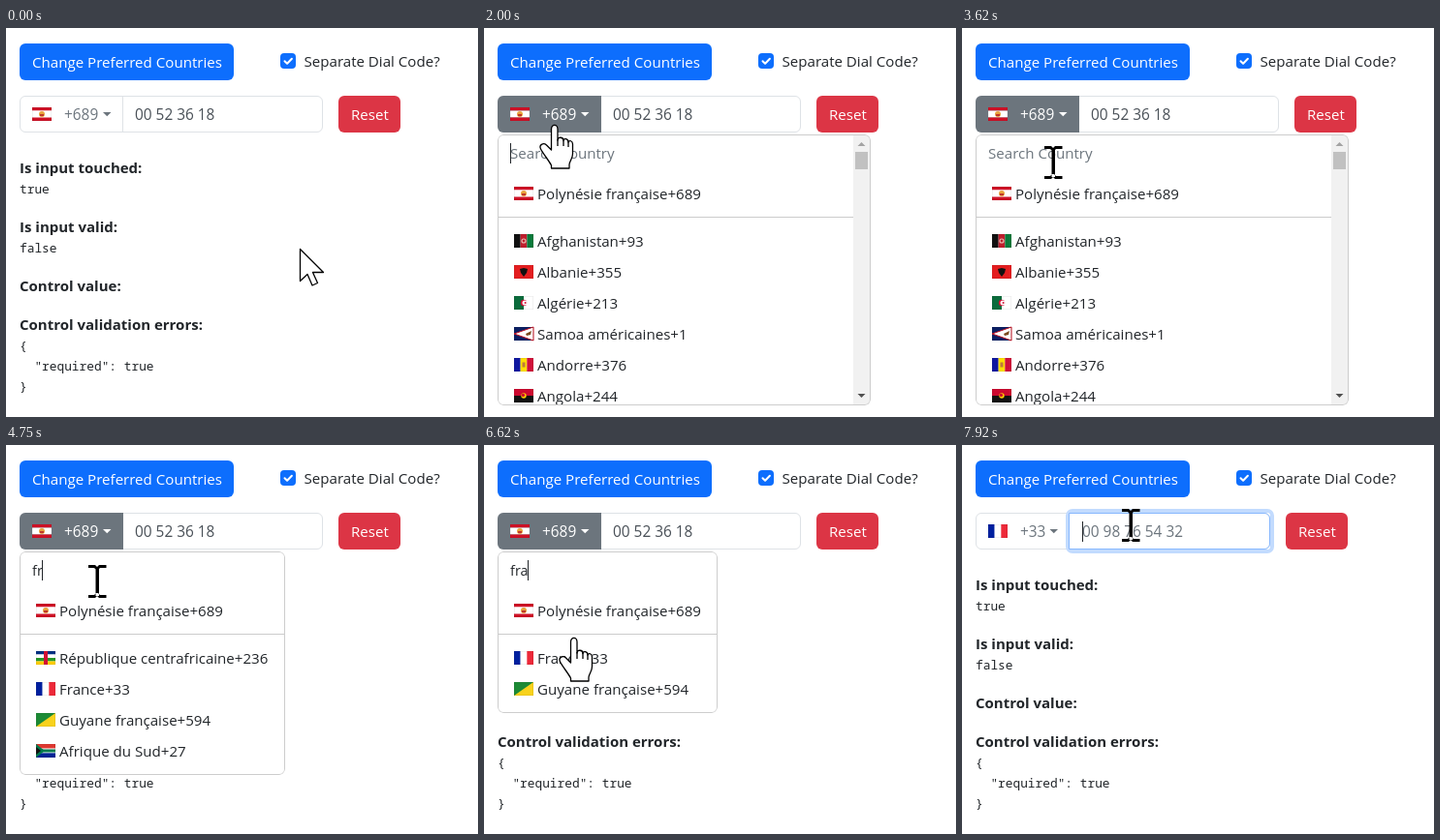
Write an HTML page that moves like this. It is 487x402 px and loops after 7.99 s.

```html
<!DOCTYPE html>
<html lang="en">
<head>
<meta charset="utf-8">
<title>Phone input demo</title>
<style>
  html, body { margin: 0; width: 100%; height: 100%; overflow: hidden; background: #fff; }
  svg { display: block; width: 487px; height: 402px; }
  text { font: 15.1px "Open Sans", "Noto Sans", sans-serif; fill: #212529; white-space: pre; }
  .bold { font-weight: 700; font-size: 15px; }
  .mono { font: 12.83px "Noto Sans Mono", "Liberation Mono", monospace; }
  .num { font-size: 15.4px; fill: #495057; }
  .query { font-size: 14.4px; }
  .muted { fill: #6c757d; }
  .white { fill: #fff; }
</style>
</head>
<body>
<svg viewBox="0 0 487 402" xmlns="http://www.w3.org/2000/svg">
  <defs><clipPath id="menuClip"><rect id="menuClipBox" x="14" y="110" rx="6"/></clipPath></defs>
  <g id="page"></g>
  <g id="field"></g>
  <g id="menu" clip-path="url(#menuClip)"></g>
  <path id="caret" stroke="#212529" stroke-width="1"/>
  <g id="cursor"></g>
</svg>
<script>
const LOOP = 7990;
const $ = id => document.getElementById(id);
const rect = (x, y, w, h, fill, extra = '') =>
  `<rect x="${x}" y="${y}" width="${w}" height="${h}" fill="${fill}" ${extra}/>`;
const shape = (d, fill, extra = '') => `<path d="${d}" fill="${fill}" ${extra}/>`;
const dot = (x, y, r, fill) => `<circle cx="${x}" cy="${y}" r="${r}" fill="${fill}"/>`;
const text = (x, y, s, cls = '', extra = '') =>
  `<text x="${x}" y="${y}" class="${cls}" ${extra}>${s}</text>`;
const clamp = v => Math.min(1, Math.max(0, v));
const ramp = (t, a, b) => clamp((t - a) / (b - a));
const smooth = p => p * p * (3 - 2 * p);
const lerp = (a, b, p) => a + (b - a) * p;

// Flags, drawn on a 20 x 14 field
const bars = (...c) => c.map((f, i) => rect(i * 20 / c.length, 0, 20 / c.length, 14, f)).join('');
const bands = (...c) => c.map((f, i) => rect(0, i * 14 / c.length, 20, 14 / c.length, f)).join('');
const ensign = c => rect(0, 0, 20, 14, c) +
  shape('M0 0L10 7M10 0L0 7M5 0V7M0 3.5H10', 'none', 'stroke="#fff" stroke-width="2"') +
  shape('M5 0V7M0 3.5H10', 'none', 'stroke="#c8102e"') + rect(13, 4, 4, 6, '#e8e8e8');
const RED = '#ce1126';
const FLAGS = {
  pf: bands(RED, '#fff', '#fff', RED) + dot(10, 7, 3, '#e8a33d') + rect(8, 7, 4, 2, '#c0392b'),
  af: bars('#111', '#be1e2d', '#0a7a3b') + dot(10, 7, 2.6, '#e8b9ae') + dot(10, 7, 1.4, '#be1e2d'),
  al: rect(0, 0, 20, 14, '#e41e20') + shape('M10 3L14 4L13 8L10 12L7 8L6 4Z', '#111'),
  dz: bars('#0b6b3c', '#fff') + dot(10, 7, 3.2, '#d21034') + dot(11, 7, 2.5, '#fff') + dot(11.6, 7, 1, '#d21034'),
  as: rect(0, 0, 20, 14, '#0b1f63') + shape('M20 0L0 7L20 14Z', '#fff', 'stroke="#bd1021"') +
    shape('M12 7L18 4L17 8L13 9Z', '#7b4a1e'),
  ad: bars('#1018a0', '#fedf00', '#d0103a') + rect(8.5, 4.5, 3, 5, '#c07a3a'),
  ao: bands('#cc092f', '#111') + dot(10, 7, 2.7, '#ffcb00') + dot(9.4, 6.4, 1.7, '#cc092f'),
  fr: bars('#00209f', '#fff', '#ed2939'),
  gf: rect(0, 0, 20, 14, '#f8d21c') + shape('M0 0H20L0 14Z', '#1c8a35') + '',
  bf: bands('#ef2b2d', '#009e49') + dot(10, 7, 2, '#fcd116'),
  cf: bands('#003082', '#fff', '#289728', '#ffce00') + rect(8, 0, 4, 14, '#d21034'),
  fk: ensign('#012169'),
  fo: rect(0, 0, 20, 14, '#fff') + shape('M7 0V14M0 7H20', 'none', 'stroke="#0065bd" stroke-width="4"') +
    shape('M7 0V14M0 7H20', 'none', 'stroke="#ed2939" stroke-width="2"'),
  fj: ensign('#68bfe5'),
  za: bands('#de3831', '#fff', '#002395') + rect(0, 5.5, 20, 3, '#007a4d') +
    shape('M0 0L9 7L0 14Z', '#007a4d') + shape('M0 3L5 7L0 11Z', '#111')
};
const flag = (x, y, code) => `<g transform="translate(${x} ${y})">${FLAGS[code]}` +
  rect(.25, .25, 19.5, 13.5, 'none', 'stroke="#000" stroke-opacity=".1" stroke-width=".5"') + '</g>';

const NAMES = {
  af: 'Afghanistan+93', al: 'Albanie+355', dz: 'Algérie+213', as: 'Samoa américaines+1',
  ad: 'Andorre+376', ao: 'Angola+244', fr: 'France+33', gf: 'Guyane française+594',
  bf: 'Burkina Faso+226', cf: 'République centrafricaine+236', fk: 'Îles Malouines+500',
  fo: 'Îles Féroé+298', fj: 'Fidji+679', za: 'Afrique du Sud+27'
};
const VIEWS = {
  '': { w: 385, h: 280, caret: 27.5, rows: ['af', 'al', 'dz', 'as', 'ad', 'ao'], thumb: 18 },
  f: { w: 312, h: 280, caret: 32.5, rows: ['af', 'bf', 'cf', 'fk', 'fo', 'fj'], thumb: 120 },
  fr: { w: 274, h: 231, caret: 37.5, rows: ['cf', 'fr', 'gf', 'za'] },
  fra: { w: 227, h: 167, caret: 45.5, rows: ['fr', 'gf'] }
};

function drawMenu(query, hover) {
  const { w, h, rows, thumb } = VIEWS[query];
  const right = 14 + w, bottom = 110 + h;
  const inner = thumb ? right - 18 : right - 1;
  let s = rect(14, 110, w, h, '#fff');
  s += query ? text(27, 135, query, 'query') : text(27, 135, 'Search Country', 'muted');
  s += flag(31, 164, 'pf') + text(55, 177, 'Polynésie française+689');
  s += rect(15, 195, inner - 15, 1, '#cbcbcb');
  if (hover) s += rect(15, 204, inner - 15, 32, '#f2f2f2');
  rows.forEach((code, i) => {
    const y = 220 + 32 * i;
    s += flag(31, y - 7, code) + text(55, y + 6, NAMES[code]);
  });
  if (thumb) {
    const mid = right - 9.5;
    s += rect(right - 18, 111, 17, h - 2, '#f1f1f1') + rect(right - 16, 128, 13, thumb, '#c1c1c1');
    s += shape(`M${mid - 4} 122h8l-4 -4z`, '#a3a3a3');
    s += shape(`M${mid - 4} ${bottom - 12}h8l-4 4z`, '#505050');
  }
  s += rect(14.5, 110.5, w - 1, h - 1, 'none', 'rx="5.5" stroke="#cdcdcd"');
  $('menu').innerHTML = s;
  $('menuClipBox').setAttribute('width', w);
  $('menuClipBox').setAttribute('height', h);
}

function drawPage() {
  const lines = [
    [150, 'Is input touched:', 'bold'], [171, 'true', 'mono'],
    [211, 'Is input valid:', 'bold'], [232, 'false', 'mono'],
    [272, 'Control value:', 'bold'], [312, 'Control validation errors:', 'bold'],
    [333, '{', 'mono'], [375, '}', 'mono']
  ];
  $('page').innerHTML = rect(14, 16, 221, 38, '#0d6efd', 'rx="6"') +
    text(27, 41, 'Change Preferred Countries', 'white') +
    rect(283, 26, 16, 16, '#0d6efd', 'rx="4"') +
    shape('M287.5 34.2l2.6 2.6l4.8 -5', 'none',
      'stroke="#fff" stroke-width="2" stroke-linecap="round" stroke-linejoin="round"') +
    text(307.5, 40, 'Separate Dial Code?') +
    lines.map(([y, s, cls]) => text(14, y, s, cls)).join('') +
    text(29.4, 354, '"required": true', 'mono');
}

function drawField(chosen, grey, focus) {
  const split = chosen ? 111 : 121, right = chosen ? 318 : 327;
  const ink = [108, 117, 125].map(c => Math.round(lerp(c, 255, grey)));
  const fill = `rgb(${ink})`;
  const arrow = chosen ? 90.5 : 100;
  let s = rect(14.5, 70.5, right - 15, 37, '#fff', 'rx="5.5" stroke="#dee2e6"');
  s += rect(split - 1, 71, 1, 36, '#dee2e6');
  s += shape(`M${split} 70H20a6 6 0 0 0 -6 6v26a6 6 0 0 0 6 6H${split}z`, '#6c757d', `opacity="${grey}"`);
  s += flag(27, 82, chosen ? 'fr' : 'pf');
  s += text(60, 95, chosen ? '+33' : '+689', 'num', `style="fill:${fill}"`);
  s += shape(`M${arrow} 87h8.5l-4.25 4.3z`, fill);
  if (chosen) {
    s += rect(109, 68, 211, 42, 'none', `rx="5" stroke="#c2dbfe" stroke-width="4" opacity="${focus}"`);
    s += shape('M110.5 70.5H312a5.5 5.5 0 0 1 5.5 5.5v26a5.5 5.5 0 0 1 -5.5 5.5H110.5z', '#fff',
      `stroke="#86b7fe" stroke-opacity="${focus}"`);
    s += text(124, 95, '00 98 76 54 32', 'num muted');
  } else {
    s += text(133, 95, '00 52 36 18', 'num');
  }
  s += rect(right + 16, 70, 64, 38, '#dc3545', 'rx="6"') + text(right + 29, 95, 'Reset', 'white');
  $('field').innerHTML = s;
}

const outline = 'stroke="#000" stroke-width="1.3" stroke-linejoin="round"';
const CURSORS = {
  arrow: shape('M.5 .5V33.5L8 26.5L13 38L18.5 35.5L13.5 24.5H24.5Z', '#fff', outline),
  hand: shape('M-2.5 4.5C-2.5 -1 4 -1 4 4.5V16C4 12 10 12.5 10 16.5C10 13.5 15 14 15 18' +
    'C16 15.5 19.5 16.5 19.5 20V30C19.5 35 16.5 37 16 41V45H-2.5V42C-5 37 -11 30 -13.5 25' +
    'C-15.5 21 -11 18 -7.5 21L-2.5 26Z', '#fff', outline) +
    shape('M4 15V22M10 16V22M15 17V23', 'none', outline),
  beam: shape('M-1.5 -14H2V15H-1.5ZM-9 -17H-2L0 -15L2 -17H9.5V-14H3L1 -12H-1L-3 -14H-9Z' +
    'M-9 17H-2L0 15L2 17H9.5V14H3L1 12H-1L-3 14H-9Z', '#000')
};

// Moves from a to b in n equal hops, the first at t0 and the last at t1
function hop(t, t0, t1, n, a, b) {
  const k = t < t0 ? 0 : Math.min(n, Math.floor((t - t0) / ((t1 - t0) / (n - 1)) + 1.001));
  const p = smooth(k / n);
  return [lerp(a[0], b[0], p), lerp(a[1], b[1], p)];
}

function pointer(t) {
  if (t < 2000) {
    const [x, y] = hop(t, 450, 1210, 12, [303, 228], [72, 100]);
    return [y < 108 ? 'hand' : 'arrow', x, y];
  }
  if (t < 2600) {
    const [x, y] = hop(t, 2130, 2400, 5, [72, 100], [94, 143]);
    return [y < 110 ? 'hand' : 'beam', x, y];
  }
  if (t < 5890) return ['beam', 94, t < 4280 ? 139 : 141];
  if (t < 6690) {
    const [x, y] = hop(t, 5960, 6620, 10, [94, 141], [92, 199]);
    return [y < 152 ? 'beam' : 'hand', x, y];
  }
  if (t < 6830) return ['hand', 92, 216];
  const [x, y] = hop(t, 7160, 7920, 12, [92, 220], [174, 83]);
  return [y < 108 ? 'beam' : 'arrow', x, y];
}

const blink = (t, start) => Math.floor((t - start) / 530) % 2 === 0;
const seen = {};
function refresh(key, draw, ...args) {
  const id = args.join();
  if (seen[key] !== id) { seen[key] = id; draw(...args); }
}

function render(t) {
  const open = t >= 1940 && t < 6830;
  const chosen = t >= 6830;
  const query = t < 4280 ? '' : t < 4750 ? 'f' : t < 5080 ? 'fr' : 'fra';
  const grey = ramp(t, 1070, 1210) * (1 - ramp(t, 6770, 6960));
  refresh('field', drawField, chosen, grey, ramp(t, 6770, 6960));

  $('menu').style.display = open ? '' : 'none';
  if (open) refresh('menu', drawMenu, query, t >= 6690);

  const typed = t < 4280 ? 2030 : t < 4750 ? 4280 : t < 5080 ? 4750 : 5040;
  const caretOn = chosen ? blink(t, 6830) : open && t >= 2000 && blink(t, Math.min(t, typed));
  $('caret').style.display = caretOn ? '' : 'none';
  $('caret').setAttribute('d', chosen ? 'M124.5 79V100' : `M${VIEWS[query].caret} 119V140`);

  const [kind, x, y] = pointer(t);
  refresh('cursor', k => { $('cursor').innerHTML = CURSORS[k]; }, kind);
  $('cursor').setAttribute('transform', `translate(${x.toFixed(1)} ${y.toFixed(1)})`);
}

drawPage();
const start = performance.now();
function tick() {
  render((performance.now() - start) % LOOP);
  requestAnimationFrame(tick);
}
tick();
</script>
</body>
</html>
```
